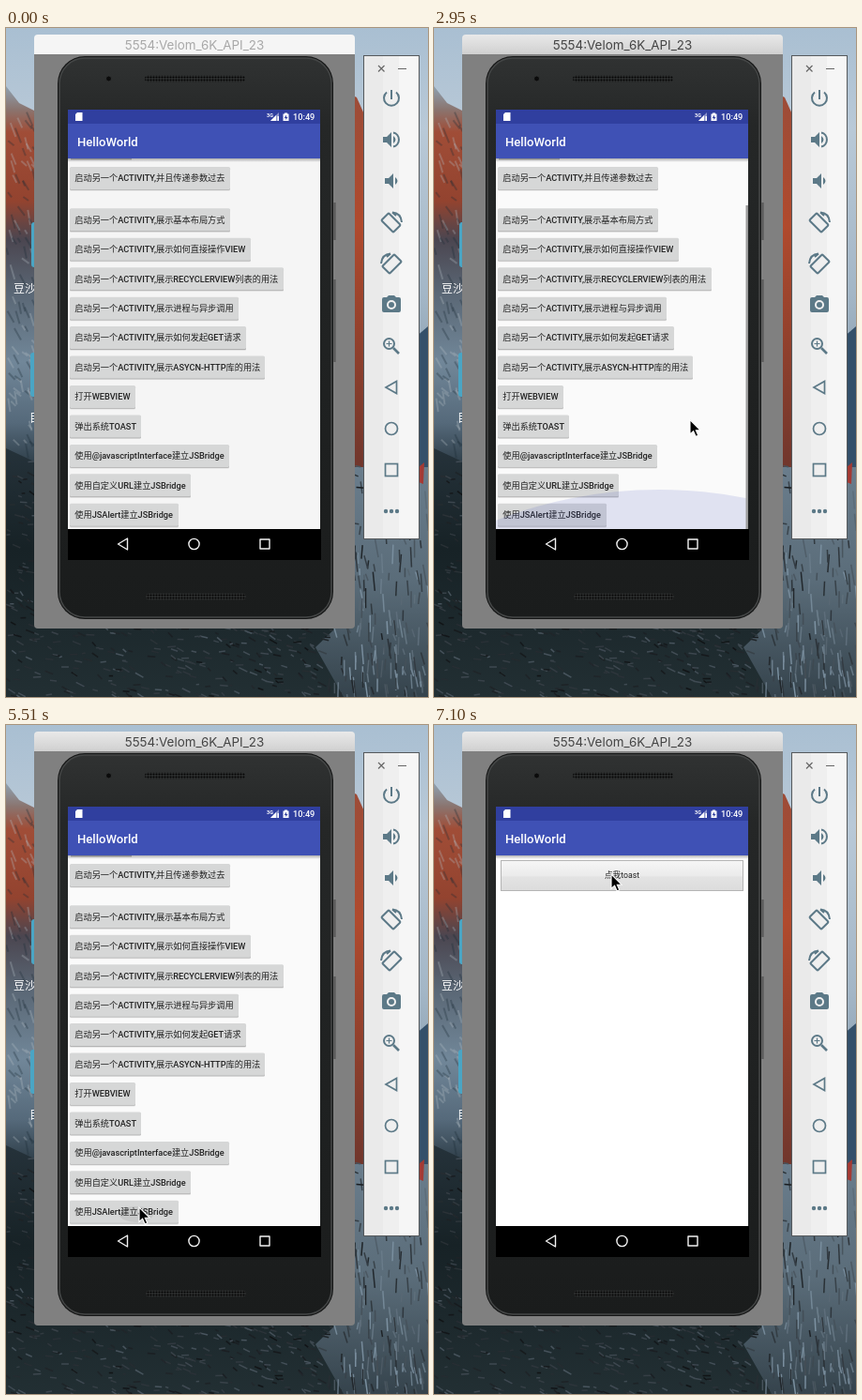
These frames come from a looping animation (450x713 px, 8000 ms). An HTML page:

```html
<!DOCTYPE html>
<html lang="zh">
<head>
<meta charset="utf-8">
<style>
  html, body { margin: 0; width: 100%; height: 100%; overflow: hidden; background: #14191b; }
  svg { display: block; width: 450px; height: 713px; }
  text { font-family: Roboto, "Noto Sans CJK SC", "Noto Sans CJK", sans-serif; }
  #list text { font-size: 9.2px; font-weight: 500; fill: #222; }
  .line { fill: none; stroke: #5c7987; stroke-width: 2; }
  .solid { fill: #5c7987; }
</style>
</head>
<body>
<svg viewBox="0 0 450 713" xmlns="http://www.w3.org/2000/svg">
  <defs>
    <linearGradient id="sky" x2="0" y2="1">
      <stop stop-color="#a9bfd2"/><stop offset=".15" stop-color="#b9c9d7"/>
      <stop offset=".4" stop-color="#a3b6c6"/><stop offset=".6" stop-color="#7d93a5"/>
    </linearGradient>
    <linearGradient id="slope" x2="0" y2="1">
      <stop stop-color="#8fa2b1"/><stop offset=".06" stop-color="#8a7570"/>
      <stop offset=".12" stop-color="#a04d37"/><stop offset=".3" stop-color="#93432f"/>
      <stop offset=".4" stop-color="#4b4650"/><stop offset=".54" stop-color="#5a6775"/>
      <stop offset=".72" stop-color="#718799"/><stop offset=".88" stop-color="#55697a"/>
      <stop offset="1" stop-color="#2a3943"/>
    </linearGradient>
    <linearGradient id="redRock" x2="0" y2="1">
      <stop stop-color="#9c4c38"/><stop offset=".35" stop-color="#b04a2d"/><stop offset="1" stop-color="#70362c"/>
    </linearGradient>
    <linearGradient id="cliff" x2="0" y2="1">
      <stop stop-color="#6a7d8c"/><stop offset=".5" stop-color="#5a6c79"/><stop offset="1" stop-color="#35434c"/>
    </linearGradient>
    <linearGradient id="forest" x2="0" y2="1">
      <stop stop-color="#25323a"/><stop offset=".4" stop-color="#172226"/><stop offset="1" stop-color="#222f33"/>
    </linearGradient>
    <linearGradient id="titleBar" x2="0" y2="1">
      <stop stop-color="#e9e9e9"/><stop offset="1" stop-color="#d0d0d0"/>
    </linearGradient>
    <linearGradient id="phoneBody" x2="0" y2="1">
      <stop stop-color="#303232"/><stop offset=".12" stop-color="#252727"/><stop offset="1" stop-color="#1a1c1c"/>
    </linearGradient>
    <linearGradient id="webButton" x2="0" y2="1">
      <stop stop-color="#f6f6f6"/><stop offset=".5" stop-color="#ebebeb"/>
      <stop offset=".55" stop-color="#e3e3e3"/><stop offset="1" stop-color="#dcdcdc"/>
    </linearGradient>
    <linearGradient id="barShadow" x2="0" y2="1">
      <stop stop-opacity=".3"/><stop offset="1" stop-opacity="0"/>
    </linearGradient>
    <pattern id="mesh" width="3" height="3" patternUnits="userSpaceOnUse">
      <rect width="3" height="3" fill="#2d2f2f"/><circle cx="1.5" cy="1.5" r="1.1" fill="#050505"/>
    </pattern>
    <clipPath id="content"><rect x="66" y="139" width="269" height="395"/></clipPath>
    <clipPath id="screen"><rect x="66" y="87" width="269" height="447"/></clipPath>
  </defs>

  <!-- desktop -->
  <rect width="450" height="713" fill="url(#sky)"/>
  <path d="M0 62L14 80L30 88V470H0Z" fill="url(#slope)"/>
  <path d="M366 70L374 74L382 92V470H366Z" fill="url(#redRock)"/>
  <path d="M436 330L450 318V470L436 478Z" fill="#34506a"/>
  <path d="M340 468H450V713H290Z" fill="url(#cliff)"/>
  <path d="M440 468L446 463L445 486L440 484Z" fill="#a33a34"/>
  <path d="M0 448L30 462L330 600L372 620L330 660L360 713H0Z" fill="url(#forest)"/>
  <g id="rocks"></g>
  <g fill="#4aa5c4"><rect x="27" y="207" width="20" height="48" rx="3"/><rect x="26" y="346" width="20" height="47" rx="3"/></g>
  <g font-size="12" fill="#fff"><text x="8" y="282">豆沙</text><text x="25" y="420">目</text></g>

  <!-- emulator window -->
  <path d="M30 28V11q0-4 4-4H368q4 0 4 4V28Z" id="title"/>
  <text id="titleText" x="201" y="23" text-anchor="middle" style="font:13.4px Inter,sans-serif">5554:Velom_6K_API_23</text>
  <path d="M30 28H372V636q0 4-4 4H34q-4 0-4-4Z" fill="#808080"/>
  <path d="M350.500 186V226M350.500 268V356" stroke="#555" stroke-width="2"/>
  <rect x="55" y="30" width="294" height="600" rx="29" fill="#161717"/>
  <rect x="57" y="32" width="290" height="596" rx="27" fill="url(#phoneBody)" stroke="#454747" stroke-width="1.500"/>
  <circle cx="109.500" cy="54" r="3" fill="#0b0b0b" stroke="#303232"/>
  <rect x="148" y="50.500" width="107" height="7" rx="3.500" fill="url(#mesh)"/>
  <rect x="149" y="602.500" width="107" height="7" rx="3.500" fill="url(#mesh)"/>

  <!-- phone screen -->
  <g clip-path="url(#screen)">
    <rect id="paper" x="66" y="87" width="270" height="447"/>
    <g id="list" clip-path="url(#content)"></g>
    <ellipse id="ripple" cx="139" cy="521.500" rx="18" ry="8.500" fill-opacity=".07"/>
    <g clip-path="url(#content)"><circle id="glow" cx="240" r="480" fill="#3f51b5"/></g>
    <rect id="scrollbar" x="332.500" y="189" width="2.500" height="345" fill="#9b9b9b"/>
    <g id="appBar">
      <rect x="66" y="139" width="270" height="4" fill="url(#barShadow)"/>
      <rect x="66" y="87" width="270" height="15" fill="#303f9f"/>
      <rect x="66" y="102" width="270" height="37" fill="#3f51b5"/>
      <g fill="#fff">
        <path d="M76 90H81.500V99H74V92Z"/>
        <path d="M291 90V99H282Z" fill-opacity=".45"/><path d="M288 93V99H282Z"/><path d="M289.500 94H291V99H289.500Z"/>
        <path d="M297 90.500H300V91.500H301.500V99H295.500V91.500H297Z"/>
        <path d="M299 92.500L296.800 96H298.300V98L300.500 95H299Z" fill="#303f9f"/>
        <text x="278" y="94.500" font-size="5.500" font-weight="700">3G</text>
        <text x="306" y="98" font-size="9.200" font-weight="500">10:49</text>
        <text x="76" y="125.700" font-size="13.100" font-weight="500">HelloWorld</text>
      </g>
    </g>
    <g id="page">
      <rect x="66" y="139" width="270" height="395" fill="#fff"/>
      <use href="#appBar"/>
      <g id="toastButton">
        <rect x="71.500" y="144.500" width="258" height="32" fill="url(#webButton)" stroke="#b4b4b4"/>
        <text x="200.500" y="163.200" text-anchor="middle" font-size="8.700" fill="#222">点我toast</text>
      </g>
    </g>
  </g>
  <rect x="66" y="534" width="270" height="33"/>
  <g fill="none" stroke="#f2f2f2" stroke-width="1.400" stroke-linejoin="round">
    <path d="M119.500 550L129.500 544V556Z"/><circle cx="200.500" cy="550" r="5.600"/>
    <rect x="271" y="545" width="10" height="10"/>
  </g>

  <!-- emulator toolbar -->
  <rect x="381.500" y="29.500" width="59" height="515" fill="#f6f6f6" stroke="#55595c"/>
  <path d="M382 30H402V544H382Z" fill="#eaeaea"/><path d="M402 30H419V544H402Z" fill="#efefef"/>
  <path d="M397 40L403.500 46.500M403.500 40L397 46.500M418 43.500H427" class="line" style="stroke-width:1.200;stroke:#666"/>
  <g transform="translate(411 75)" class="line"><path d="M0-9V1M-5-6.500A8 8 0 1 0 5-6.500"/></g>
  <g transform="translate(411 119)">
    <path class="solid" d="M-9-3H-5L0-8V8L-5 3H-9ZM2-4Q7 0 2 4Z"/><path class="line" d="M2-7.500A7.700 7.700 0 0 1 2 7.500"/>
  </g>
  <path class="solid" transform="translate(411 163)" d="M-7-3H-3L2-8V8L-3 3H-7ZM4-4Q9 0 4 4Z"/>
  <g id="rotate" transform="translate(411 207)" class="line">
    <rect x="-9" y="-5.500" width="18" height="11" rx="1" transform="translate(-.500 .500) rotate(45)"/>
    <path d="M1-10.500Q10-10 11 0M1-10.500L5-7"/>
  </g>
  <use href="#rotate" transform="translate(822 44) scale(-1 1)"/>
  <g transform="translate(411 295)">
    <path class="solid" d="M-3-10H3L5-8H8Q10-8 10-6V6Q10 8 8 8H-8Q-10 8-10 6V-6Q-10-8-8-8H-5Z"/>
    <circle r="4" fill="#5c7987" stroke="#f1f1f1" stroke-width="2"/>
  </g>
  <g transform="translate(411 339)" class="line">
    <circle cx="-2.500" cy="-2.500" r="5.500"/><path d="M2 2L8 8" stroke-width="2.600"/><path d="M-5.500-2.500H.5M-2.500-5.500V.5" stroke-width="1.200"/>
  </g>
  <g class="line" style="stroke-width:1.700">
    <path d="M405 383L416.500 376.500V389.500Z"/><circle cx="411" cy="427" r="6.500"/><rect x="404.500" y="464.500" width="13" height="13"/>
  </g>
  <g class="solid"><circle cx="405" cy="515" r="2.200"/><circle cx="411" cy="515" r="2.200"/><circle cx="417" cy="515" r="2.200"/></g>

  <path id="cursor" d="M0 0V15.500L3.600 12.200L6.200 18L8.800 16.800L6.300 11.200H11Z" stroke="#fff" stroke-width="1.100"/>
</svg>
<script>
const $ = id => document.getElementById(id);
const LOOP = 8000, TICK = 88.7;

// label, centre y, right edge
const open = '启动另一个ACTIVITY,';
const buttons = [
  [open + '并且传递参数过去', 160, 239],
  [open + '展示基本布局方式', 204.3, 239],
  [open + '展示如何直接操作VIEW', 235.7, 261],
  [open + '展示RECYCLERVIEW列表的用法', 267.2, 296],
  [open + '展示进程与异步调用', 298.7, 248],
  [open + '展示如何发起GET请求', 330.1, 256],
  [open + '展示ASYCN-HTTP库的用法', 361.5, 276],
  ['打开WEBVIEW', 393, 138],
  ['弹出系统TOAST', 424.4, 144],
  ['使用@javascriptInterface建立JSBridge', 455.9, 238],
  ['使用自定义URL建立JSBridge', 487.3, 197],
  ['使用JSAlert建立JSBridge', 518.8, 184],
];
$('list').innerHTML = '<rect x="69" y="139" width="65" height="1.500" fill="#bbb"/>' + buttons.map(([label, y, right]) => {
  const box = (dy, fill) => `<rect x="68" y="${y - 12 + dy}" width="${right - 68}" height="24" rx="1.500" ${fill}/>`;
  return box(1.6, 'fill-opacity=".1"') + box(.8, 'fill-opacity=".2"') + box(0, 'fill="#d6d7d7"') +
    `<text x="73.300" y="${y + 3.3}">${label}</text>`;
}).join('');

// rough streaks on the cliffs, the wooded slope and the left rock face
let seed = 7;
const random = () => (seed = seed * 16807 % 2147483647) / 2147483647;
const streak = (x, y, dx, dy, style) => `<path d="M${x} ${y}l${dx} ${dy}" ${style}/>`;
let streaks = '';
for (let i = 0; i < 1100; i++) {
  const x = random() * 450, y = 462 + random() * 251;
  const cliff = x > 350 - (y - 620) * .2;
  const tone = cliff ? 30 + random() * 95 : 16 + random() * 58;
  const dx = cliff ? -2 + random() * 6 : 3 + random() * 6;
  const dy = cliff ? 6 + random() * 16 : random() * 6 - 1;
  streaks += streak(x, y, dx, dy, `stroke="rgb(${tone},${tone * 1.17},${tone * 1.3})" stroke-width="1.500"`);
}
for (let i = 0; i < 90; i++) {
  const shade = i % 2 ? '#1c2a36' : '#b3bcc4';
  streaks += streak(random() * 30, 85 + random() * 370, 2 + random() * 6, 4 + random() * 12,
    `stroke="${shade}" stroke-opacity=".3" stroke-width="2"`);
}
$('rocks').innerHTML = streaks;

// linear interpolation through [tick, ...values] keys
function track(keys, n) {
  const i = keys.findIndex(key => key[0] > n);
  if (i < 0) return keys[keys.length - 1].slice(1);
  if (!i) return keys[0].slice(1);
  const [a, b] = [keys[i - 1], keys[i]], k = (n - a[0]) / (b[0] - a[0]);
  return a.slice(1).map((v, j) => v + (b[j + 1] - v) * k);
}
const cursorPath = [
  [14, 414, 684], [17, 350, 590], [21, 271, 498], [24, 271, 498], [26, 271, 493.5], [27, 271, 493.5],
  [33, 273, 417.5], [35, 273, 417.5], [40, 250, 458], [45, 214, 502], [48, 203, 509.5],
  [55, 151, 514], [58, 142, 514], [67, 142, 514], [68, 143, 508.5],
  [72, 160, 340], [77, 169, 181], [80, 189, 159],
];
const glowPath = [[28, 0], [33, 1], [36, 1], [39, .5], [44, 0]];
const barPath = [[27, 0], [29, 1], [49, 1], [53, 0]];
const pagePath = [[63, 0, 22], [64, .4, 12], [65, .8, 4], [66, 1, 0]];

function draw(now) {
  const n = Math.floor(now % LOOP / TICK);
  const set = (id, name, value) => $(id).setAttribute(name, value);
  const active = n >= 20;
  set('title', 'fill', active ? 'url(#titleBar)' : '#f5f5f5');
  set('titleText', 'fill', active ? '#444' : '#a8a8a8');
  set('paper', 'fill', n < 28 ? '#f5f5f5' : '#fafafa');

  const [glow] = track(glowPath, n);
  set('glow', 'cy', 534 - 42 * glow + 480);
  set('glow', 'opacity', .14 * glow);
  set('scrollbar', 'opacity', track(barPath, n)[0]);
  set('ripple', 'opacity', n >= 62 && n < 66 ? 1 : 0);

  const [alpha, shift] = track(pagePath, n);
  set('page', 'opacity', alpha);
  set('page', 'transform', `translate(0 ${shift})`);
  set('toastButton', 'opacity', n >= 69 ? 1 : 0);

  set('cursor', 'opacity', n >= 14 ? 1 : 0);
  set('cursor', 'transform', `translate(${track(cursorPath, n).join(' ')})`);
}
const start = performance.now();
(function loop() {
  draw(performance.now() - start);
  requestAnimationFrame(loop);
})();
</script>
</body>
</html>
```
